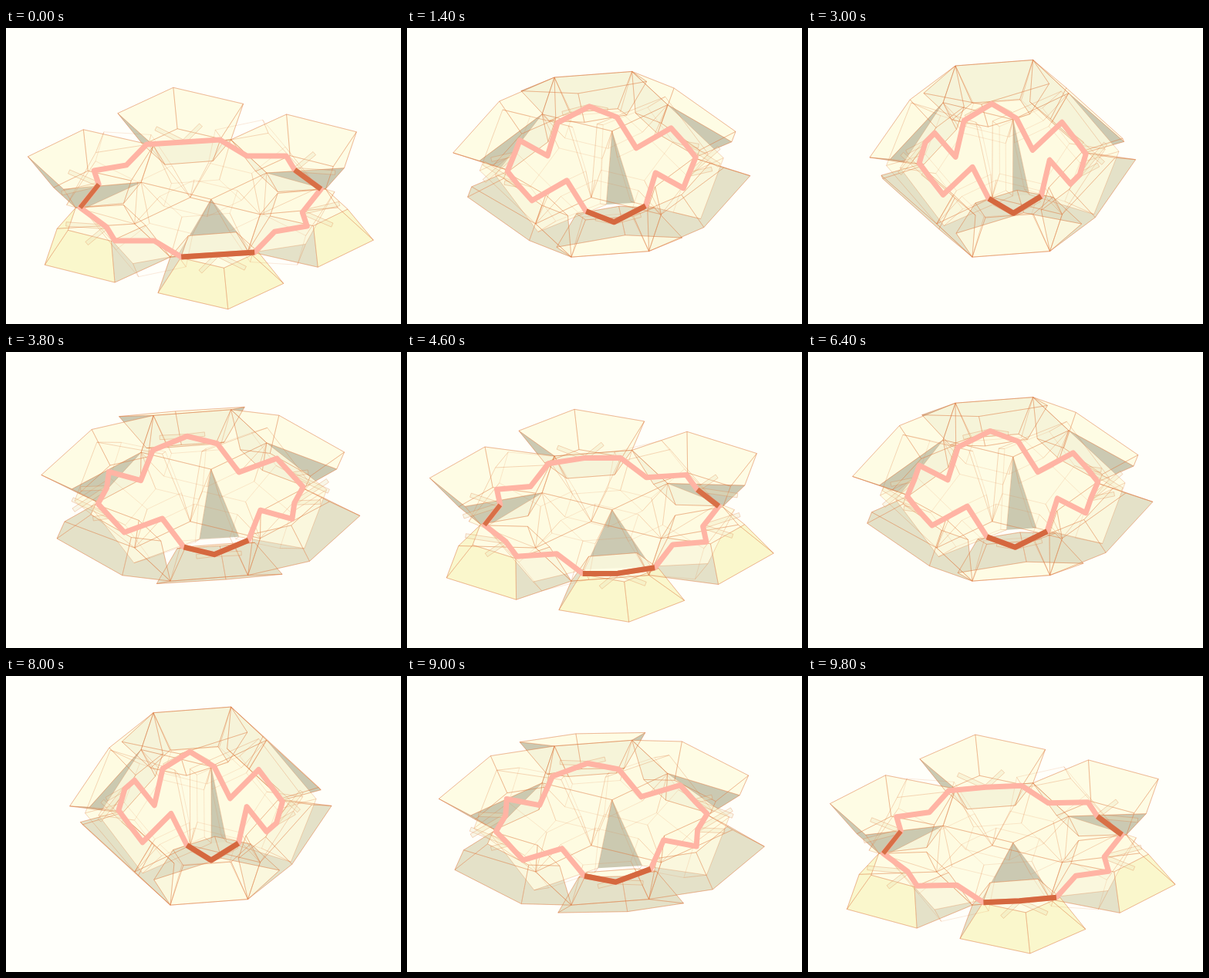
These frames come from a looping animation (512x384 px, 10000 ms). An HTML page with a canvas:

```html
<!DOCTYPE html>
<html>
<head>
<meta charset="utf-8">
<style>
html, body { margin: 0; width: 100%; height: 100%; overflow: hidden; background: #fffffa; }
canvas { display: block; }
</style>
</head>
<body>
<canvas id="stage" width="512" height="384"></canvas>
<script>
const ctx = document.getElementById('stage').getContext('2d');
const RAD = Math.PI / 180, PERIOD = 25.25, START = 0.56;
const DEPTH = 0.4253, SHRINK = 0.618, RADIUS = 0.8507;
const RIM = [[0, 0], [1, 0], [1.309, 0.951], [0.5, 1.539], [-0.309, 0.951]];
const CORE = RIM.map(([a, b]) => [0.5 + (a - 0.5) * SHRINK, 0.688 + (b - 0.688) * SHRINK, DEPTH]);
const LINE = 'rgba(222,120,65,.5)', FAINT = 'rgba(222,120,65,.28)';
const PALE = 'rgba(254,252,225,.85)', YELLOW = 'rgba(250,247,200,.9)';
const LIGHT_GREY = 'rgba(226,223,196,.92)', GREY = 'rgba(199,197,172,.92)';

// Half of the linkage ring in three poses; the other half is its inversion.
const POSE_FOLDS = [1, 37.2, 48.2];
const POSES = [
  [[-70,-70],[-22,-73],[25,-76],[60,-55],[111,-55],[122,-37],[156,-12],[132,18],[138,36],[96,43]],
  [[-57,-54],[-16,-75],[20,-61],[45,-21],[90,-47],[108,-27],[122,-9],[113,13],[106,31],[70,11]],
  [[-50,-49],[-14,-71],[18,-52],[39,-11],[77,-47],[91,-29],[108,-6],[100,21],[88,33],[61,2]]
];

// Faces hinged around the plate: ring joint of the bars, or rim shifts of the loose flaps.
const FACES = [
  { shift: [[0, 0], [0, 0], [-5, -22], [13, -7], [-30, 4]] },
  { joint: 17 },
  { joint: 1 },
  { joint: 5 },
  { shift: [[0, 0], [0, 0], [11, 4], [-21, -13], [0, -20]] }
];

function path(points, fill, stroke, width = 0.7, closed = true) {
  ctx.beginPath();
  points.forEach(p => ctx.lineTo(p[0], p[1]));
  if (closed) ctx.closePath();
  if (fill) { ctx.fillStyle = fill; ctx.fill(); }
  if (stroke) { ctx.strokeStyle = stroke; ctx.lineWidth = width; ctx.stroke(); }
}

const area = points => points.reduce((sum, p, i) => {
  const n = points[(i + 1) % points.length];
  return sum + p[0] * n[1] - n[0] * p[1];
}, 0);

function ringPoints(fold, cy) {
  const weights = POSE_FOLDS.map((f, j) =>
    POSE_FOLDS.reduce((w, g, k) => k === j ? w : w * (fold - g) / (f - g), 1));
  const half = POSES[0].map((_, i) => [0, 1].map(k => weights.reduce((sum, w, j) => sum + w * POSES[j][i][k], 0)));
  return [1, -1].flatMap(s => half.map(p => [252.2 + s * p[0], cy + s * p[1]]));
}

const polar = (angle, radius) => [radius * Math.cos(angle * RAD), radius * Math.sin(angle * RAD)];

// Maps hinge-plane coordinates (along, outward, depth) to space.
function hingeFrame(k, fold, height) {
  const start = 81 + 72 * k, p = polar(start, RADIUS), q = polar(start + 72, RADIUS);
  const [nx, ny] = polar(start + 36, 1);
  const c = Math.cos(fold * RAD), s = Math.sin(fold * RAD);
  return ([a, b, d = 0]) => {
    const out = b * c - d * s;
    return [p[0] + (q[0] - p[0]) * a + nx * out, p[1] + (q[1] - p[1]) * a + ny * out, height - b * s - d * c];
  };
}

// Collects the polygons of one half; the lower half is the inversion of the upper one.
function buildHalf(sign, pose, scene) {
  const { fold, height, cy, open, ring } = pose, upper = sign > 0;
  const project = ([x, y, z]) => [252.3 + sign * 101.8 * x, cy + sign * (48.4 * y - 89.6 * z)];
  const nearness = points => sign * points.reduce((sum, p) => sum + 0.88 * p[1] + 0.475 * p[2], 0) / points.length;
  const add = (points, depth, fill, line = LINE) => scene.faces.push({ points, depth, fill, line });

  const rims = FACES.map(({ shift, joint }, k) => {
    const at = hingeFrame(k, shift ? 15 + 0.75 * fold : fold, height);
    const rim3 = RIM.map(at), core3 = CORE.map(at), core = core3.map(project);
    const rim = rim3.map((v, i) => project(v).map((c, j) => shift ? c + sign * open * shift[i][j] : c));
    if (shift) {
      add(rim, nearness(rim3), PALE);
      add(core, 0, null, FAINT);
      rim.forEach((p, i) => add([p, core[i]], 0, null, FAINT));
      return rim;
    }
    add(rim, nearness(rim3), area(rim) * sign < 0 ? PALE : null);
    add(core, nearness(core3), area(core) * sign > 0 ? PALE : null);
    rim.forEach((p, i) => {
      const j = (i + 1) % 5, side = [p, rim[j], core[j], core[i]];
      const outer = i === 2 || i === 3;
      const shade = upper ? GREY : outer && open > 0.4 ? YELLOW : LIGHT_GREY;
      add(side, nearness([rim3[i], rim3[j], core3[j], core3[i]]), area(side) * sign > 0 ? shade : null);
    });

    const hub = ring[(joint + (upper ? 0 : 10)) % 20], base = project(at([0, 0]));
    for (const a of [-0.29, 0.29]) {
      const tip = project(at([a, 0.43])), dx = tip[0] - base[0], dy = tip[1] - base[1];
      const r = 2.7 / Math.hypot(dx, dy), corner = (t, s) => [hub[0] + dx * t - s * r * dy, hub[1] + dy * t + s * r * dx];
      scene.bars.push([corner(0, 1), corner(1, 1), corner(1, -1), corner(0, -1)]);
    }
    return rim;
  });

  const plate3 = FACES.map((_, k) => [...polar(81 + 72 * k, RADIUS), height]);
  const plate = plate3.map(project);
  const core = FACES.map((_, k) => project([...polar(81 + 72 * k, RADIUS * SHRINK), height - DEPTH]));
  add(plate, nearness(plate3), upper ? PALE : null);
  add(core, 0, null, FAINT);
  plate.forEach((p, i) => add([p, core[i]], 0, null, FAINT));
  // Shadowed inside seen between the two front flaps.
  if (upper) add([rims[0][0], rims[0][4], rims[4][2]], 0.3, GREY, null);
}

function drawRing(ring, open) {
  ctx.lineCap = 'round';
  path(ring, null, '#ffb4a4', 7);
  ctx.lineCap = 'butt';
  path(ring.slice(10, 13), null, '#d5683f', 7, false);
  if (open > 0.5) {
    path(ring.slice(5, 7), null, '#d87047', 7, false);
    path(ring.slice(16, 18), null, '#d87047', 6, false);
  }
}

function frame(now) {
  const phase = (Math.floor(now % 10000 / 200) + START) % PERIOD;
  const fold = -2 + 5.18 * Math.min(phase, PERIOD - phase);
  const height = 0.985 * Math.sin(fold * RAD) + DEPTH * Math.cos(fold * RAD);
  const cy = 260.5 - 89.6 * height;
  const open = Math.min(1, 1 - fold / 64) ** 2.5;
  const ring = ringPoints(fold, cy);
  const scene = { faces: [], bars: [] };
  for (const sign of [-1, 1]) buildHalf(sign, { fold, height, cy, open, ring }, scene);

  ctx.fillStyle = '#fffffa';
  ctx.fillRect(0, 0, 512, 384);
  ctx.lineJoin = 'round';
  scene.faces.sort((a, b) => a.depth - b.depth);
  scene.faces.forEach(f => path(f.points, f.fill));
  scene.faces.forEach(f => path(f.points, null, f.line, 0.6));
  scene.bars.forEach(bar => path(bar, 'rgba(235,225,185,.3)', LINE, 0.6));
  drawRing(ring, open);
  requestAnimationFrame(frame);
}
requestAnimationFrame(frame);
</script>
</body>
</html>
```
